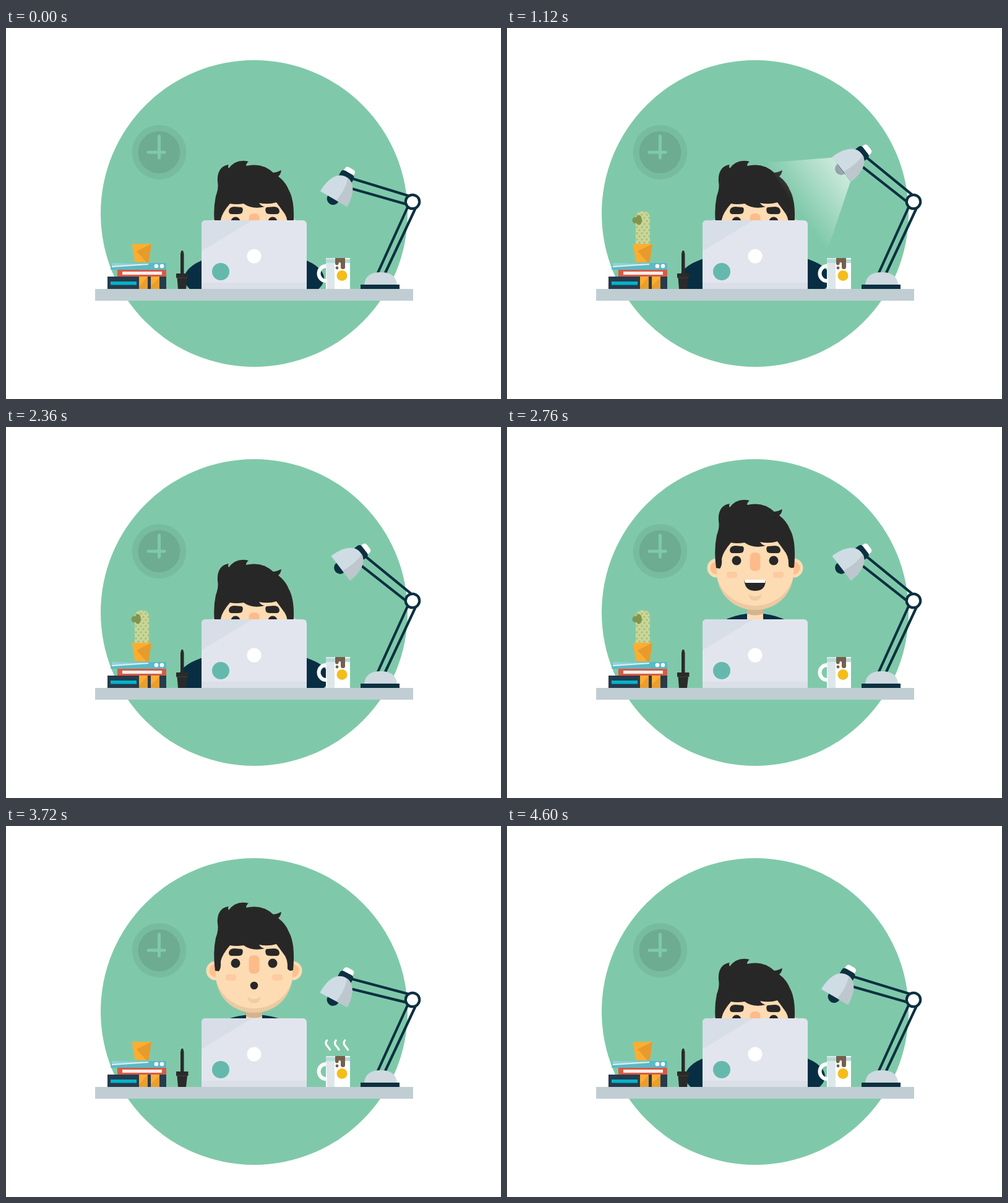
Write an HTML page that moves like this. It is 800 px wide and 600 px high and loops after 4640 ms.

```html
<!DOCTYPE html>
<html lang="en">
<head>
<meta charset="utf-8">
<title>Desk</title>
<style>
html, body { margin: 0; width: 100%; height: 100%; overflow: hidden; background: #fff; }
svg { display: block; width: 100%; height: 100%; }
</style>
</head>
<body>
<svg viewBox="0 0 800 600">
  <defs>
    <pattern id="dots" width="8" height="10" patternUnits="userSpaceOnUse">
      <g fill="#aabd7b"><circle cx="2" cy="2" r="1.7"/><circle cx="6" cy="7" r="1.7"/></g>
    </pattern>
    <linearGradient id="beam" gradientUnits="userSpaceOnUse" x1="541" y1="228" x2="462" y2="286">
      <stop stop-color="#fff" stop-opacity=".6"/>
      <stop offset="1" stop-color="#fff" stop-opacity="0"/>
    </linearGradient>
    <clipPath id="aboveDesk"><path d="M0 0H800V422H0Z"/></clipPath>
    <clipPath id="faceClip"><use href="#face"/></clipPath>
  </defs>

  <circle cx="401" cy="300" r="248" fill="#7fc9aa"/>

  <g id="clock">
    <circle cx="247.500" cy="201" r="44" fill="#78bc9f"/>
    <circle cx="247.500" cy="201" r="34" fill="#6dac90"/>
    <path d="M247.500 175V210M230 201H256" stroke="#7fc9aa" stroke-width="5" stroke-linecap="round"/>
  </g>

  <g id="person" clip-path="url(#aboveDesk)">
    <ellipse id="body" cx="401" fill="#082e43"/>
    <g id="head">
      <path d="M388 290H414V322H388Z" fill="#fddcb4"/>
      <path d="M388 290H414V308Q401 313 388 308Z" fill="#d3b48f"/>
      <g fill="#fddcb4"><circle cx="339" cy="234" r="15.500"/><circle cx="463" cy="234" r="15.500"/></g>
      <g fill="#fdc08f"><circle cx="339" cy="234" r="10.500"/><circle cx="463" cy="234" r="10.500"/></g>
      <path id="face" d="M339 185H463V240C463 276 436 302 401 302S339 276 339 240Z" fill="#ebcaa2"/>
      <ellipse cx="401" cy="233" rx="64" ry="62" fill="#fddcb4" clip-path="url(#faceClip)"/>
      <path d="M338 234Q334 205 339 181Q344 168 342 158C341 143 346 132 360 130Q358 133 360 136Q372 120 392 125Q388 128 388 132Q414 126 432 143Q439 142 445 139Q444 146 440 149Q452 158 457 171Q468 190 464 233Q458 236 455 231Q456 215 448 206L437 191Q424 195 409 192Q412 197 418 198Q398 203 384 193Q372 195 362 193Q349 208 347 219Q348 230 344 235Z" fill="#282727"/>
      <g fill="#282727">
        <path d="M360 205Q361 198 369 198L381 199Q384 201 382 207Q381 210 375 210H365Q360 210 360 205Z"/>
        <path d="M442 205Q441 198 433 198L421 199Q418 201 420 207Q421 210 427 210H437Q442 210 442 205Z"/>
        <circle cx="371" cy="222" r="7.500"/><circle cx="431" cy="222" r="7.500"/>
      </g>
      <rect x="392.500" y="209" width="17" height="30" rx="7" fill="#fdbb8c"/>
      <g fill="#fdcb9f">
        <rect x="355" y="240" width="17" height="10" rx="4"/>
        <rect x="430" y="240" width="17" height="10" rx="4"/>
      </g>
      <path d="M390 276Q401 284 412 276Q410 287 401 287T390 276Z" fill="#efcda2"/>
      <g id="smile">
        <path d="M383.500 253H418Q418 271 401 271T383.500 253Z" fill="#282727"/>
        <path d="M383.500 253H418L417 258H385Z" fill="#fff"/>
      </g>
      <circle id="gasp" cx="401" cy="258" r="6.300" fill="#282727"/>
    </g>
  </g>

  <g id="laptop">
    <path d="M316 422V318Q316 311 323 311H479Q486 311 486 318V422Z" fill="#e2e5ee"/>
    <path d="M316 361V318Q316 311 323 311H398Z" fill="#d7dee8"/>
    <path d="M316 412H486V422H316Z" fill="#dadfe8"/>
    <circle cx="401" cy="369" r="11.500" fill="#fff"/>
    <circle cx="347" cy="394" r="14" fill="#65b9ac"/>
  </g>

  <g id="books">
    <path d="M164 402H259V422H164Z" fill="#273b4c"/>
    <path d="M169 410H211V415.500H169Z" fill="#00b4cc"/>
    <path d="M215 402H229V422H215ZM234 402H248V422H234Z" fill="#fcae32"/>
    <path d="M229 402V422H215V418ZM248 404V422H234V417Z" fill="#ea9e2e"/>
    <path d="M180 391H259V402H180Z" fill="#d85b45"/>
    <path d="M188 394H252V399H188Z" fill="#f5eeea"/>
    <path d="M171 380H259V391H169Z" fill="#5cb9c5"/>
    <path d="M171 380L232 381L171 386Z" fill="#90d3d8"/>
    <path d="M171 385L230 381V383L171 387Z" fill="#e1f2f1"/>
    <circle cx="243" cy="385" r="3.300" fill="#fff"/><circle cx="252" cy="385" r="3.300" fill="#fff"/>
  </g>

  <g id="cactus">
    <path id="stem" d="M208 352V308Q208 296.500 219.500 296.500T231 308V352Z" fill="#c8d797"/>
    <use href="#stem" style="fill:url(#dots)"/>
    <path d="M208 352V308Q208 296.500 219.500 296.500T231 308V352Z" fill="url(#dots)"/>
    <g fill="#81954e"><ellipse cx="207" cy="311" rx="4.500" ry="5"/><ellipse cx="213" cy="310.500" rx="5" ry="8"/></g>
  </g>
  <path d="M203.500 349H235L230.500 379H208.500Z" fill="#fcae32"/>
  <path d="M235 349L211 361L227 379H230.500Z" fill="#e69b2c"/>

  <g id="penPot" fill="#2b2a2a">
    <path d="M282 398V365L283.500 360H286L287.500 365V398Z"/>
    <path d="M275 397H294.500V404H293L291 422H278L276.500 404H275Z"/>
    <path d="M276 404H293" stroke="#454343"/>
  </g>

  <g id="mug">
    <ellipse cx="517" cy="397" rx="11.500" ry="12" fill="none" stroke="#fff" stroke-width="6"/>
    <path d="M517 372H556V422H517Z" fill="#fff"/>
    <path d="M517 372H531V422H519Z" fill="#dde7ea"/>
    <path d="M517 374H556V380H517Z" fill="#b4ddd6"/>
    <path d="M532 372H548V387Q548 390 544.500 390T541 387V380Q539 377 537.500 380V382Q535 385 532 382Z" fill="#75604d"/>
    <circle cx="535" cy="388" r="2.400" fill="#75604d"/>
    <circle cx="543" cy="400.500" r="8.500" fill="#f4bd19"/>
  </g>
  <path id="steam" fill="none" stroke="#fff" stroke-width="3.200" stroke-linecap="round"/>

  <g id="lamp" fill="none" stroke="#0c3040" stroke-width="4.200">
    <path d="M649 290L600 398M662 291L612 398"/>
    <path d="M579 416Q580 395 605.500 395T632 416Z" fill="#cfd9e0" stroke="none"/>
    <path d="M573 415H636V422H573Z" fill="#0c3040" stroke="none"/>
    <g id="arm">
      <path d="M651 271.500L558 243M647 285L556 259"/>
      <g transform="translate(529.500 276.500) rotate(30)" stroke="none">
        <circle cx="-1" r="10" fill="#0c3040"/>
        <rect x="-9" y="-57" width="18" height="14" rx="5" fill="#fff"/>
        <rect x="-12" y="-49" width="24" height="15" rx="5" fill="#0c3040"/>
        <path d="M-25 0C-25 -22 -17 -41 0 -41S25 -22 25 0Z" fill="#cfdce4"/>
        <path d="M25 0C25 -22 17 -39 3 -41Q9 -24 5 0Z" fill="#bdc7cd"/>
      </g>
    </g>
    <circle cx="657" cy="281" r="11.200" fill="#fff"/>
  </g>
  <path id="light" d="M526 209.500L420 218L515 368L555 248.500Z" fill="url(#beam)"/>

  <path d="M144 422H658V441H144Z" fill="#c0ced3"/>
</svg>
<script>
const LOOP = 4640, FRAME = 40;
const $ = id => document.getElementById(id);
const mix = (a, b, u) => a + (b - a) * u;
const clamp = u => Math.min(1, Math.max(0, u));
const ease = u => u < .5 ? 4 * u ** 3 : 1 - 4 * (1 - u) ** 3;

// Eased value between [time, value] keys
function track(t, keys) {
  const i = keys.findIndex(k => k[0] > t);
  if (i < 0) return keys[keys.length - 1][1];
  if (!i) return keys[0][1];
  const [t0, a] = keys[i - 1], [t1, b] = keys[i];
  return mix(a, b, ease((t - t0) / (t1 - t0)));
}

const armKeys = [[0, 0], [100, -3], [440, 32.2], [720, 22.3], [3280, 22.3], [3460, 32.2], [3740, -2.2], [3960, 0]];
const cactusKeys = [[40, 0], [440, 1.09], [680, 1], [3200, 1], [3360, 1.09], [3640, 0]];
const headKeys = [[2360, 91], [2920, -16], [3240, 0], [3940, 0], [4160, -15], [4520, 91]];
const widthKeys = [[0, 113], [800, 122], [3300, 122], [3900, 113]];
const lightKeys = [[960, 0], [1120, 1], [1440, 1], [1600, 0]];
const steamStarts = [1560, 3640];

// Three wavy strands; both ends climb from the mug, the lower one later
function steamPath(s) {
  if (s <= 0 || s >= 520) return '';
  const top = mix(370, 317, 1 - (1 - clamp(s / 320)) ** 2);
  const bottom = mix(370, 317, s / 520);
  let d = '';
  for (const x of [520.5, 535, 549.5]) {
    for (let i = 0; i <= 20; i++) {
      const y = mix(top, bottom, i / 20);
      const wave = -3.5 * Math.cos((y - 325) / 26 * 2 * Math.PI);
      d += `${i ? 'L' : 'M'}${(x + wave).toFixed(2)} ${y.toFixed(2)}`;
    }
  }
  return d;
}

function draw(t) {
  $('arm').setAttribute('transform', `rotate(${track(t, armKeys)} 657 281)`);

  const size = track(t, cactusKeys);
  $('cactus').setAttribute('transform', `translate(219.5 350) scale(${size}) translate(-219.5 -350)`);
  $('cactus').style.display = size > .01 ? '' : 'none';

  const dy = track(t, headKeys), up = 1 - dy / 91;
  const ry = mix(44, 50, up);
  $('head').setAttribute('transform', `translate(0 ${dy})`);
  $('body').setAttribute('rx', mix(track(t, widthKeys), 82, up));
  $('body').setAttribute('ry', ry);
  $('body').setAttribute('cy', mix(361, 305, up) + ry);

  const surprised = t >= 3440;
  $('smile').style.display = surprised ? 'none' : '';
  $('gasp').style.display = surprised ? '' : 'none';

  $('light').style.opacity = track(t, lightKeys);
  $('steam').setAttribute('d', steamStarts.map(s => steamPath(t - s)).join(''));
}

const start = performance.now();
function tick() {
  const t = (performance.now() - start) % LOOP;
  draw(Math.floor(t / FRAME) * FRAME);
  requestAnimationFrame(tick);
}
tick();
</script>
</body>
</html>
```
